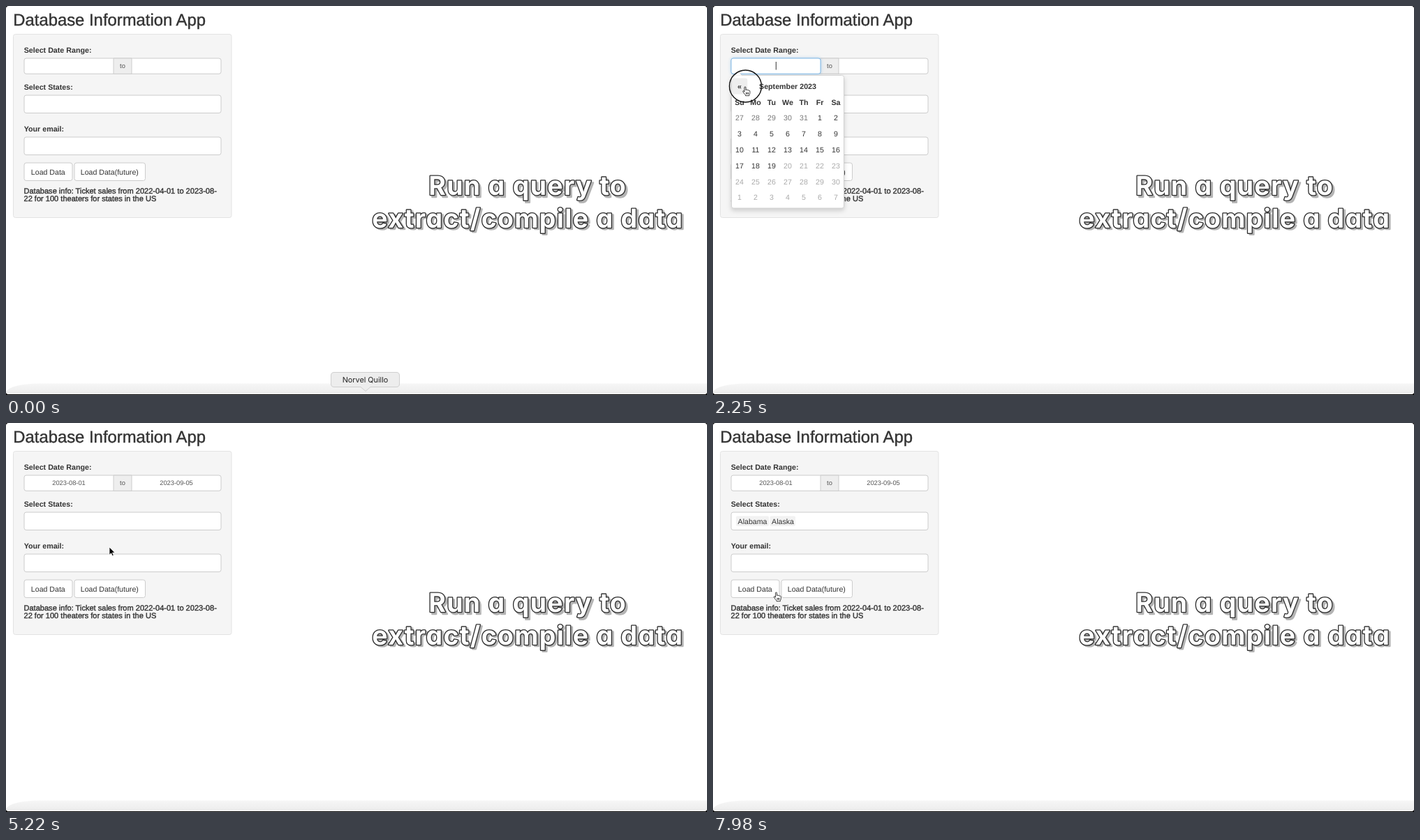
An HTML page for the animation above (8000 ms loop, 1004x558 px).

```html
<!DOCTYPE html>
<html lang="en">
<head>
<meta charset="utf-8">
<title>Database Information App</title>
<style>
html, body { margin: 0; width: 100%; height: 100%; overflow: hidden; background: #000; }
svg { display: block; width: 100vw; height: 100vh; }
text { font: 10.6px "Liberation Sans", Arial, sans-serif; fill: #333; text-rendering: geometricPrecision; white-space: pre; }
.mid { text-anchor: middle; }
.b { font-size: 10.7px; font-weight: 700; }
.title { font-size: 23.85px; stroke: #333; stroke-width: .4px; }
.info { font-size: 11.05px; stroke: #333; stroke-width: .38px; }
.date { font-size: 9.3px; fill: #555; text-anchor: middle; }
.old { fill: #777; }
.off { fill: #aaa; }
.tip { font: 10.8px Inter, "Open Sans", sans-serif; fill: #222; text-anchor: middle; }
.big { font: 700 37.5px Inter, "Open Sans", sans-serif; letter-spacing: 1.3px; font-feature-settings: "cv11"; text-anchor: middle;
  fill: #fff; stroke: #2d2d2d; stroke-width: 2.6px; stroke-linejoin: round; paint-order: stroke; }
.big.shade { fill: #b4b4b4; stroke: #b4b4b4; }
.box { fill: #fff; stroke: #ccc; }
.focus { fill: #fff; stroke: #85bdea; filter: drop-shadow(0 0 2px rgba(102,175,233,.45)); }
.pop { filter: drop-shadow(0 3px 3px rgba(0,0,0,.17)); }
.caret { stroke: #333; stroke-width: 1px; }
</style>
</head>
<body>
<svg id="stage" viewBox="0 0 1004 558" preserveAspectRatio="none"></svg>
<script>
const LOOP = 8000;
const text = (x, y, s, cls = '') => `<text x="${x}" y="${y}" class="${cls}">${s}</text>`;
const rect = (x, y, w, h, attrs = 'class="box"', r = 3) =>
  `<rect x="${x}" y="${y}" width="${w}" height="${h}" rx="${r}" ${attrs}/>`;
const group = (id, body, attrs = '') => `<g id="${id}" ${attrs}>${body}</g>`;
const caret = (id, x, y, h) => `<path id="${id}" class="caret" d="M${x} ${y}v${h}"/>`;

// Six weeks from the Sunday on or before the first; days past the limit are greyed.
function month(id, x, year, m, next) {
  const first = new Date(Date.UTC(year, m, 1));
  const limit = Date.UTC(2023, 8, 19);
  const col = i => x + 12 + i * 23;
  const name = first.toLocaleString('en-US', { month: 'long', timeZone: 'UTC' });
  let out = text(col(0), 118.5, '«', 'mid b') + text(col(3), 118.5, `${name} ${year}`, 'mid b');
  if (next) out += text(col(6), 118.5, '»', 'mid b');
  'Su Mo Tu We Th Fr Sa'.split(' ').forEach((d, i) => out += text(col(i), 141.8, d, 'mid b'));
  for (let i = 0; i < 42; i++) {
    const day = new Date(Date.UTC(year, m, 1 - first.getUTCDay() + i));
    const cls = +day > limit ? 'off' : day.getUTCMonth() !== m ? 'old' : '';
    out += text(col(i % 7), 164.3 + Math.floor(i / 7) * 22.8, day.getUTCDate(), 'mid ' + cls);
  }
  return group(id, out);
}

const calendar = (id, x, body) => group(id,
  `<g class="pop">${rect(x + .5, 99.5, 161, 190.5, 'fill="#fff" stroke="#d2d2d2"')}</g>
   <path d="M${x + 5} 100l5.5-5.5 5.5 5.5z" fill="#fff" stroke="#d2d2d2" stroke-width=".7"/>
   <path d="M${x + 5.5} 100.6h10" stroke="#fff"/>` + body);

const states = ['Alabama', 'Alaska', 'Arizona', 'Arkansas', 'California', 'Colorado',
  'Connecticut', 'Delaware', 'Florida', 'Georgia'];
const list = picked => ['All', ...states.slice(picked)].slice(0, 8)
  .map((s, i) => text(35.7, 173.2 + i * 19.75, s)).join('');
const tag = (id, x, w, s) => group(id,
  rect(x, 133.5, w, 14.5, 'fill="#f2f2f2"', 2) + text(x + 2.6, 144.5, s));
const headline = (x, y, s) => text(x + 2.8, y + 2.8, s, 'big shade') + text(x, y, s, 'big');

document.getElementById('stage').innerHTML = `
  <defs>
    <clipPath id="menuClip"><rect x="26" y="155" width="282" height="153"/></clipPath>
    <linearGradient id="dock" x2="0" y2="1">
      <stop stop-color="#f6f6f6"/><stop offset="1" stop-color="#ececec"/>
    </linearGradient>
  </defs>
  <rect width="1004" height="557" rx="4" fill="#fff"/>
  <path d="M0 553Q8 542 48 541.5H1004V553Q1004 557 1000 557H4Q0 557 0 553z" fill="url(#dock)"/>`
  + text(10.3, 28.2, 'Database Information App', 'title')
  + rect(10.5, 40.5, 312.5, 263, 'fill="#f5f5f5" stroke="#e3e3e3"')
  + text(25.7, 67, 'Select Date Range:', 'b')
  + rect(26, 75, 282, 22.3)
  + '<path d="M154 75h26v22.3h-26z" fill="#eee" stroke="#ccc"/>'
  + text(167, 89.2, 'to', 'date')
  + rect(26, 75, 128, 22.3, 'id="focusA" class="focus"')
  + rect(180, 75, 128, 22.3, 'id="focusB" class="focus"')
  + caret('caretA', 90.3, 80, 11.5) + caret('caretB', 244.3, 80, 11.5)
  + group('dateA', text(90, 89.2, '2023-08-01', 'date'))
  + group('dateB', text(244, 89.2, '2023-09-05', 'date'))
  + text(25.7, 120, 'Select States:', 'b')
  + rect(26, 128, 282, 25.5)
  + rect(26, 128, 282, 25.5, 'id="focusC" class="focus"')
  + tag('tagA', 33, 47, 'Alabama') + tag('tagB', 81.5, 36.5, 'Alaska')
  + caret('caretC', 0, 134.5, 12.5)
  + text(25.7, 180, 'Your email:', 'b')
  + rect(26, 188, 282, 25.5)
  + rect(26, 225, 69, 25.5) + text(60.3, 241.9, 'Load Data', 'mid')
  + rect(98, 225, 101.5, 25.5) + text(148.3, 241.9, 'Load Data(future)', 'mid')
  + text(25.5, 268.7, 'Database info: Ticket sales from 2022-04-01 to 2023-08-', 'info')
  + text(25.5, 280, '22 for 100 theaters for states in the US', 'info')
  + calendar('calA', 26,
      rect(26.8, 103.5, 22.5, 23, 'id="hoverPrev" fill="#eee"')
      + rect(72.5, 149.5, 23, 22.5, 'id="hoverOne" fill="#eee"')
      + month('sepA', 26, 2023, 8, false) + month('augA', 26, 2023, 7, true))
  + calendar('calB', 180,
      rect(226.5, 172.3, 23, 22.5, 'id="hoverFive" fill="#eee"')
      + month('sepB', 180, 2023, 8, false))
  + group('menu',
      `<g class="pop">${rect(26, 155.5, 282, 152.5, 'fill="#fff" stroke="#d8d8d8" stroke-width=".8"', 2)}</g>`
      + group('menuRows',
          '<rect id="rowHover" x="26.6" width="280.4" height="19.75" fill="#f5f5f5"/>'
          + group('list0', list(0)) + group('list1', list(1)) + group('list2', list(2)),
          'clip-path="url(#menuClip)"'))
  + headline(747.2, 270.8, 'Run a query to')
  + headline(747.2, 317.6, 'extract/compile a data')
  + group('tip',
      `<path d="M470 525.5H559Q563.5 525.5 563.5 530V542Q563.5 546.5 559 546.5H522L515 552.5L508 546.5H470
        Q465.5 546.5 465.5 542V530Q465.5 525.5 470 525.5z" fill="#ededed" stroke="#cfcfcf"/>`
      + text(514.5, 539.7, 'Norvel Quillo', 'tip'))
  + group('pointer',
      '<circle id="ring" r="23" fill="none" stroke="#111" stroke-width="1.4"/>'
      + `<path id="arrow" d="M0 0V11.2L2.6 8.8L4.3 12.6L6.2 11.8L4.5 8.1H8z" fill="#000" stroke="#fff" stroke-width=".8"/>`
      + `<g id="ibeam" fill="none" stroke-linecap="round">
          <path d="M-3-5.5Q0-5.5 0-4Q0-5.5 3-5.5M0-4V4M-3 5.5Q0 5.5 0 4Q0 5.5 3 5.5M-1.3 1.2H1.3" stroke="#fff" stroke-width="2.4"/>
          <path d="M-3-5.5Q0-5.5 0-4Q0-5.5 3-5.5M0-4V4M-3 5.5Q0 5.5 0 4Q0 5.5 3 5.5M-1.3 1.2H1.3" stroke="#111" stroke-width="1.1"/>
        </g>`
      + `<path id="hand" transform="translate(-.6 .7)" d="M-.9 7.5V1.3Q-.9.2.1.2Q1.1.2 1.1 1.3V4.8Q1.3 4.1 2.1 4.2Q3 4.3 3.1 5.2Q3.4 4.5 4.2 4.7Q5 4.9 5.1 5.7
          Q5.4 5.2 6.1 5.4Q7 5.7 7 6.7V8.8Q7 10.5 6 11.6V13H.6V11.9Q-1 10.8-1.9 8.9L-3 7.1Q-3.4 6.2-2.6 5.9Q-1.9 5.7-1.3 6.8z
          M1.6 8.2V11M3.1 8.2V11M4.6 8.2V11" fill="#fff" stroke="#111" stroke-width=".8" stroke-linejoin="round"/>`);

// Pointer stops: time, x, y
const path = [
  [120, 495, 575], [810, 121, 91], [1650, 121, 91], [2100, 46.5, 115], [2520, 46.5, 115],
  [2880, 84, 161], [3330, 84, 161], [3720, 220, 95], [4200, 220, 95], [4290, 219, 145],
  [4530, 238, 184], [5070, 238, 184], [5220, 148, 178], [5400, 118, 147], [5820, 118, 147],
  [6090, 109, 196.5], [6870, 109, 196.5], [7200, 418, 205], [7410, 418, 205],
  [7530, 360, 202], [7950, 91, 242]
];
const shapes = [[0, 'arrow'], [750, 'ibeam'], [1830, 'hand'], [3150, 'arrow'], [3600, 'ibeam'],
  [4380, 'hand'], [4770, 'arrow'], [5340, 'ibeam'], [5940, 'hand'], [7020, 'arrow'], [7860, 'hand']];

// Spans of time in which each part is visible
const shown = {
  focusA: [[1200, 3150]], caretA: [[1200, 1700], [2200, 2700]],
  calA: [[1200, 3150]], sepA: [[1200, 2310]], augA: [[2310, 3150]],
  hoverPrev: [[2010, 2610]], hoverOne: [[2760, 3150]], dateA: [[3090, LOOP]],
  focusB: [[3840, 4800]], caretB: [[3840, 4020], [4200, 4700]], calB: [[3840, 4800]],
  hoverFive: [[4470, 4800]], dateB: [[4770, LOOP]],
  focusC: [[5580, 7320]], caretC: [[5580, 6090], [6570, 7070]],
  menu: [[5580, 7320]], list0: [[5580, 6330]], list1: [[6330, 6810]], list2: [[6810, 7320]],
  tagA: [[6330, LOOP]], tagB: [[6810, LOOP]],
  ring: [[1140, 1260], [2220, 2340], [3060, 3180], [3780, 3900], [4710, 4830],
    [5520, 5640], [6270, 6390], [6750, 6870], [7260, 7380]]
};

const $ = id => document.getElementById(id);
const show = (id, on) => $(id).style.display = on ? '' : 'none';
const clamp = v => Math.max(0, Math.min(1, v));
const mix = (a, b, k) => a + (b - a) * k;

function place(t) {
  const end = path[path.length - 1];
  if (t >= end[0]) return end.slice(1);
  const i = Math.max(1, path.findIndex(p => p[0] > t));
  const [a, b] = [path[i - 1], path[i]];
  const k = clamp((t - a[0]) / (b[0] - a[0]));
  const e = k * k * (3 - 2 * k);
  return [mix(a[1], b[1], e), mix(a[2], b[2], e)];
}

function draw(t) {
  for (const id in shown) show(id, shown[id].some(([a, b]) => t >= a && t < b));
  $('tip').style.opacity = 1 - clamp((t - 30) / 180);
  show('tip', t < 210);
  $('caretC').setAttribute('transform', `translate(${t < 6330 ? 36 : t < 6810 ? 82.5 : 120.5})`);
  const row = t < 6000 ? 0 : 1;
  $('rowHover').setAttribute('y', 159.6 + row * 19.75);
  const [x, y] = place(t);
  $('pointer').setAttribute('transform', `translate(${x} ${y})`);
  const shape = shapes.filter(s => s[0] <= t).pop()[1];
  for (const id of ['arrow', 'ibeam', 'hand']) show(id, id === shape);
}

const start = performance.now();
function tick() {
  draw((performance.now() - start) % LOOP);
  requestAnimationFrame(tick);
}
tick();
</script>
</body>
</html>
```
